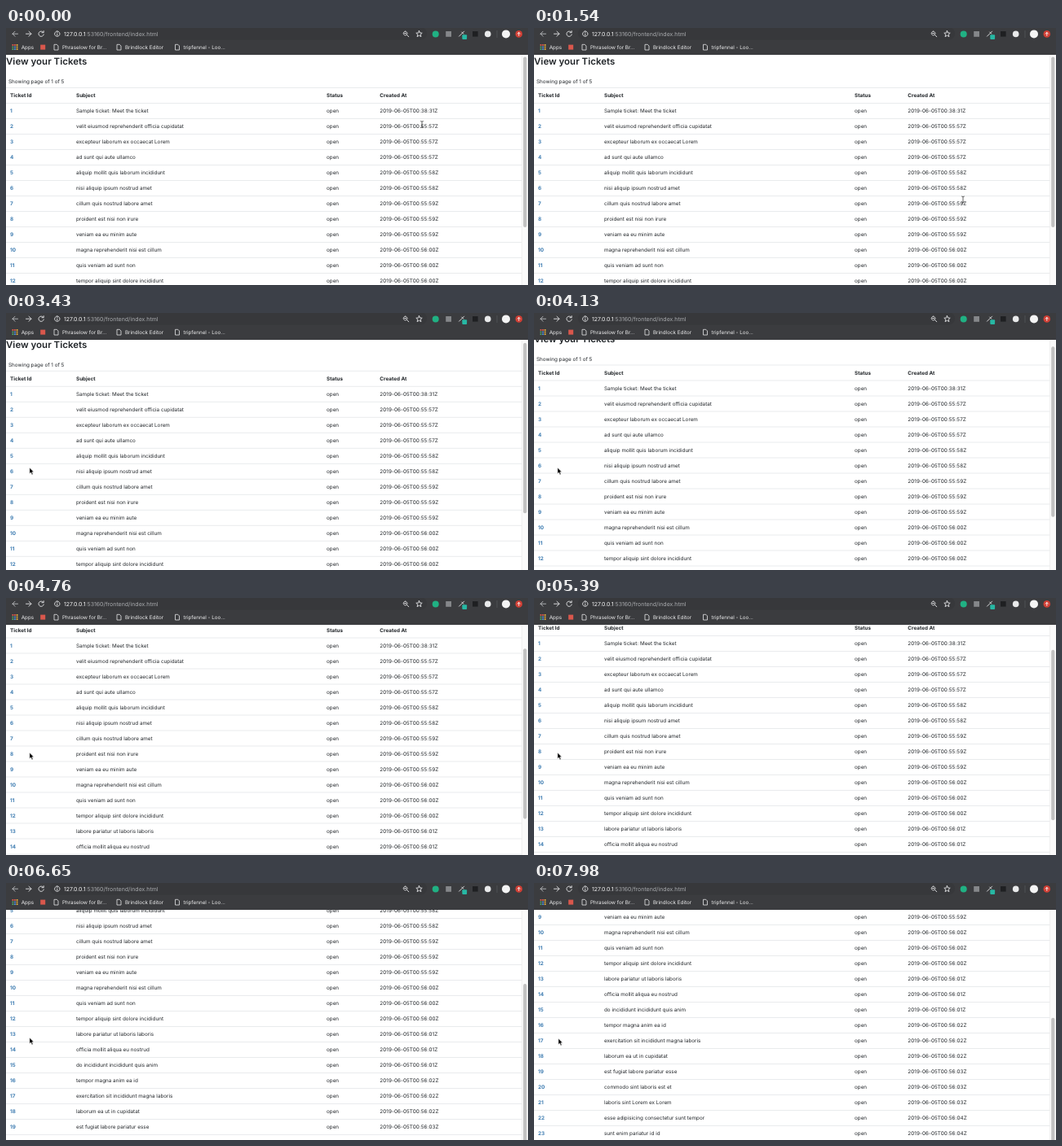
Recreate the animation shown at these times as an HTML page. Size 640x316 px, loop 8 s.

```html
<!DOCTYPE html>
<html lang="en">
<head>
<meta charset="utf-8">
<title>View your Tickets</title>
<style>
html, body { margin: 0; width: 100%; height: 100%; overflow: hidden; background: #fff; }
svg { display: block; width: 100%; height: 100%; }
text { font-family: Inter, "Liberation Sans", sans-serif; font-size: 6.34px; fill: #212529; text-rendering: geometricPrecision; white-space: pre; }
.title { font-size: 11.5px; font-weight: 600; }
.head { font-weight: 700; }
.id { font-weight: 700; fill: #3c7bb0; }
.date { letter-spacing: .07px; }
.url { font-size: 6.98px; fill: #a9abae; }
.host { fill: #f4f4f4; }
.mark { font-size: 6.3px; fill: #ededee; }
.icon { fill: none; stroke: #d5d6d8; stroke-width: 1; stroke-linecap: round; stroke-linejoin: round; }
</style>
</head>
<body>
<svg id="stage" viewBox="0 0 640 316" preserveAspectRatio="none">
  <rect width="640" height="316" fill="#fff"/>
  <g id="page"></g>
  <g id="scrollbar">
    <rect x="632.5" y="33" width="7.5" height="283" fill="#fafafa"/>
    <path d="M632.5 33V316" stroke="#e8e8e8" stroke-width=".6"/>
    <rect id="thumb" x="634.2" width="4.2" height="209.5" rx="2.1" fill="#c1c1c1"/>
  </g>
  <g id="chrome"></g>
  <path id="beam" d="M-1.8-4Q0-4 0-3Q0-4 1.8-4M0-3V3M-1.8 4Q0 4 0 3Q0 4 1.8 4" fill="none" stroke="#222" stroke-width=".7"/>
  <path id="arrow" d="M0 0V7.4L1.7 5.9L2.9 8.7L4.2 8.1L3 5.4H5.2Z" fill="#000" stroke="#fff" stroke-width=".5"/>
</svg>
<script>
const LOOP = 8000, TICK = 70, ROW = 19;
const get = id => document.getElementById(id);
const text = (x, y, cls, s) => `<text x="${x}" y="${y}" class="${cls}">${s}</text>`;
const icon = (d, extra = "") => `<path class="icon" d="${d}" ${extra}/>`;
const dot = (x, y, r, fill) => `<circle cx="${x}" cy="${y}" r="${r}" fill="${fill}"/>`;
const line = y => `<path d="M0 ${y}H632.5" stroke="#e9ebed"/>`;

const subjects = [
  "Sample ticket: Meet the ticket",
  "velit eiusmod reprehenderit officia cupidatat",
  "excepteur laborum ex occaecat Lorem",
  "ad sunt qui aute ullamco",
  "aliquip mollit quis laborum incididunt",
  "nisi aliquip ipsum nostrud amet",
  "cillum quis nostrud labore amet",
  "proident est nisi non irure",
  "veniam ea eu minim aute",
  "magna reprehenderit nisi est cillum",
  "quis veniam ad sunt non",
  "tempor aliquip sint dolore incididunt",
  "labore pariatur ut laboris laboris",
  "officia mollit aliqua eu nostrud",
  "do incididunt incididunt quis anim",
  "tempor magna anim ea id",
  "exercitation sit incididunt magna laboris",
  "laborum ea ut in cupidatat",
  "est fugiat labore pariatur esse",
  "commodo sint laboris est et",
  "laboris sint Lorem ex Lorem",
  "esse adipisicing consectetur sunt tempor",
  "sunt enim pariatur id id"
];

function created(n) {
  const sec = n === 1 ? 38 * 60 + 31 : 55 * 60 + 57 + (n < 5 ? 0 : Math.floor((n - 1) / 3));
  const two = v => String(v).padStart(2, "0");
  return `2019-06-05T00:${two(Math.floor(sec / 60))}:${two(sec % 60)}Z`;
}

function buildPage() {
  let out = text(0, 45.4, "title", "View your Tickets") + text(3, 68, "", "Showing page of 1 of 5");
  out += line(73.5) + line(92.5);
  [[5, "Ticket Id"], [86, "Subject"], [393, "Status"], [458.3, "Created At"]]
    .forEach(([x, s]) => out += text(x, 85.4, "head", s));
  subjects.forEach((s, i) => {
    const y = 104.4 + i * ROW;
    out += text(5, y, "id", i + 1) + text(86, y, "", s) + text(393, y, "", "open") +
      text(458.3, y, "date", created(i + 1)) + line(111.5 + i * ROW);
  });
  get("page").innerHTML = out;
}

function bookmark(x, name) {
  return `<path d="M${x} 20.3h3.3l1.7 1.7v5h-5z" fill="none" stroke="#e6e6e7" stroke-width=".8"/>` +
    text(x + 10, 25.8, "mark", name);
}

function buildChrome() {
  let out = `<rect width="640" height="33" fill="#3b3c3f"/>
    <rect x="54" y="-1" width="462" height="15.5" rx="7.7" fill="#37383b"/>`;
  // navigation
  out += icon("M14.5 7.2H8M11 4.2L8 7.2L11 10.2", 'opacity=".75"');
  out += icon("M24.5 7.2H31M28 4.2L31 7.2L28 10.2");
  out += icon("M45.7 5.2A3.2 3.2 0 1 0 46.3 8M46.2 3.6V5.7H44");
  out += icon("M62.8 3.9a3.2 3.2 0 1 0 .01 0M62.8 7V9M62.8 5.4V5.5", 'stroke-width=".8"');
  out += text(71, 9.8, "url", '<tspan class="host">127.0.0.1</tspan>:53160/frontend/index.html');
  out += icon("M489.6 4.1a2.4 2.4 0 1 0 .01 0M491.5 8.5L493.8 10.8M488.5 6.5H490.7");
  out += icon("M506.5 3.4L507.6 6L510.2 6.2L508.2 8L508.9 10.7L506.5 9.2L504.1 10.7L504.8 8L502.8 6.2L505.4 6Z", 'stroke-width=".8"');
  // extensions
  out += dot(526.7, 7.4, 4, "#20b183");
  out += `<rect x="539.2" y="4" width="6.8" height="6.8" fill="#85878a"/>`;
  out += icon("M555.5 10.2L559.6 6.1M558.7 5L560.8 7.1M560.2 5.5L561.6 4.1", 'stroke-width="1.3"');
  out += `<rect x="559.3" y="8.3" width="5.8" height="5.8" rx="1" fill="#27b8a4"/>`;
  out += `<rect x="572" y="4" width="6.6" height="6.6" fill="#1f2022"/>`;
  out += dot(590.7, 7.4, 3.8, "#e9eaeb");
  out += `<path d="M602 3V12" stroke="#57595c" stroke-width=".7"/>`;
  out += dot(613, 7.4, 5, "#f4f4f4") + dot(628.8, 7.4, 4.3, "#cf3f35");
  out += icon("M628.8 9.3V5.6M627.2 7.1L628.8 5.5L630.4 7.1", 'style="stroke:#fff;stroke-width:.9"');
  // bookmarks
  const colors = ["#e0594b", "#e0594b", "#e8b13c", "#53a866", "#4f8be0", "#e8b13c", "#53a866", "#4f8be0", "#e8b13c"];
  colors.forEach((c, i) => out +=
    `<rect x="${7.5 + i % 3 * 2.6}" y="${20 + Math.floor(i / 3) * 2.6}" width="1.8" height="1.8" fill="${c}"/>`);
  out += text(18.7, 25.8, "mark", "Apps");
  out += `<rect x="42.2" y="20.6" width="6" height="6" fill="#d9574c"/>`;
  out += bookmark(59, "Phraselow for Br...") + bookmark(136, "Brindlock Editor") + bookmark(207.5, "tripfennel - Loo...");
  get("chrome").innerHTML = out;
}

// keys: [time, value]
const scrollKeys = [[0, 0], [2590, 0], [2800, 2], [2870, 2.2], [3500, 2.2], [4130, 9.5], [4200, 26],
  [4690, 26], [4760, 43.5], [5320, 43.5], [5390, 46], [5460, 47], [5530, 47], [5950, 65], [6160, 84],
  [6510, 84], [6580, 110], [6650, 144], [6720, 192], [6790, 192], [6860, 208], [7350, 212]];
const xKeys = [[0, 510], [1190, 510], [1540, 526], [1750, 526], [2590, 28.9], [7560, 28.9], [7630, 29.9]];
const yKeys = [[0, 118.5], [1190, 118.5], [1540, 211], [1750, 211], [2100, 217], [2590, 190.2], [7560, 190.2], [7630, 191.2]];

const linear = k => k;
const smooth = k => k * k * (3 - 2 * k);

function track(keys, t, ease) {
  const i = keys.findIndex(k => k[0] > t);
  if (i < 0) return keys[keys.length - 1][1];
  const [t0, a] = keys[i - 1], [t1, b] = keys[i];
  return a + (b - a) * ease((t - t0) / (t1 - t0));
}

function draw(now) {
  const t = Math.floor(now % LOOP / TICK) * TICK;
  const scroll = track(scrollKeys, t, linear);
  get("page").setAttribute("transform", `translate(0 ${-scroll})`);
  get("thumb").setAttribute("y", 35.5 + scroll * .614);
  const place = `translate(${track(xKeys, t, smooth)} ${track(yKeys, t, smooth)})`;
  const overText = t < 1820;
  get("beam").setAttribute("transform", place);
  get("arrow").setAttribute("transform", place);
  get("beam").style.display = overText ? "" : "none";
  get("arrow").style.display = overText ? "none" : "";
}

buildPage();
buildChrome();
const start = performance.now();
function frame() {
  draw(performance.now() - start);
  requestAnimationFrame(frame);
}
frame();
</script>
</body>
</html>
```
